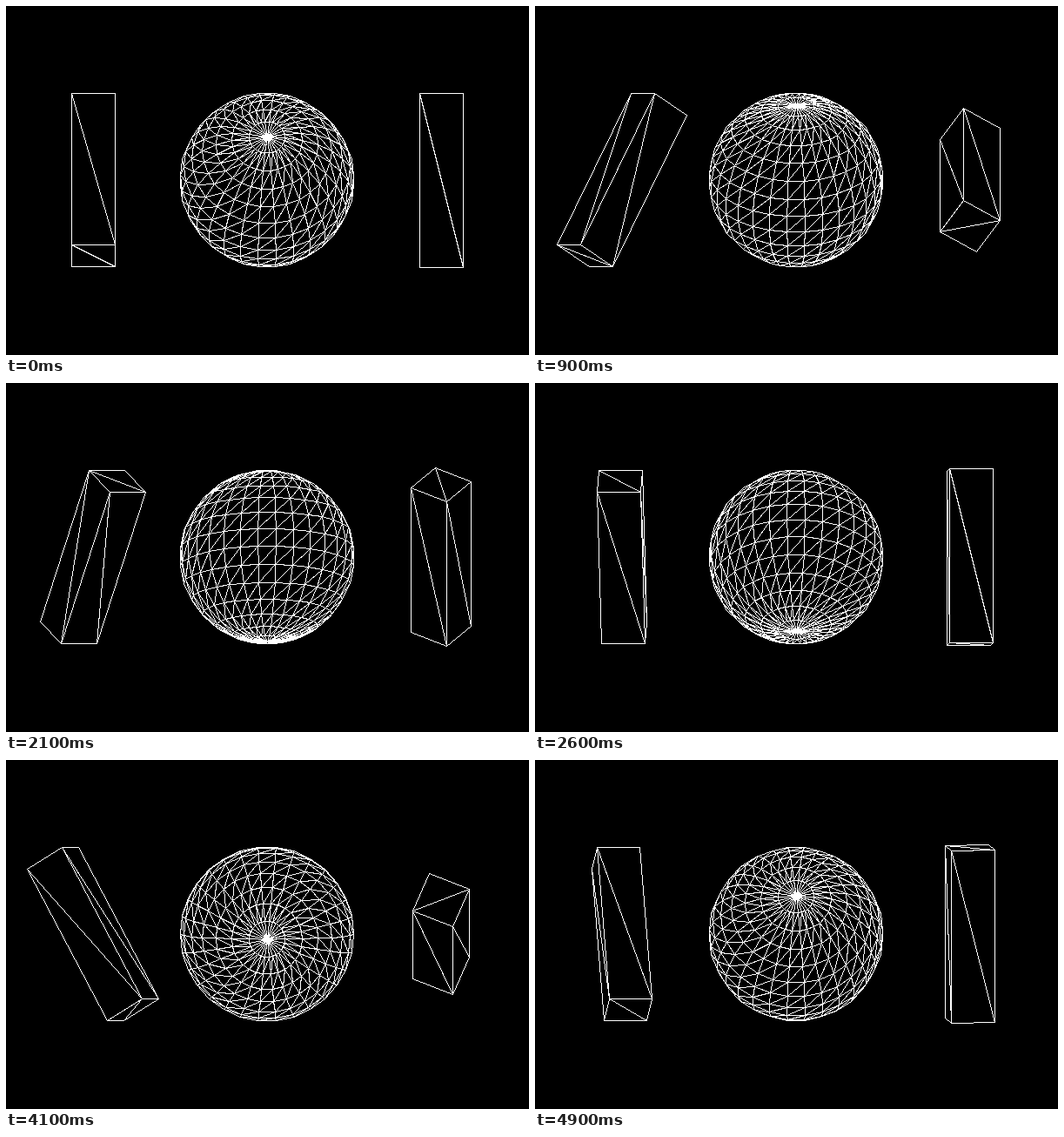
These frames come from a looping animation (601 by 401 pixels, 5000 ms). An HTML page with a canvas:

```html
<!DOCTYPE html>
<html lang="en">
<head>
<meta charset="utf-8">
<title>Wireframe solids</title>
<style>
  html, body { margin: 0; width: 100%; height: 100%; overflow: hidden; background: #000; }
  canvas { display: block; }
</style>
</head>
<body>
<canvas id="stage" width="601" height="401"></canvas>
<script>
const W = 601, H = 401;
const LOOP = 5000, STEP = 100, TURN_STEPS = 49;
const BLACK = 0xff000000, WHITE = 0xffffffff;

const ctx = document.getElementById('stage').getContext('2d');
const image = ctx.createImageData(W, H);
const pixels = new Uint32Array(image.data.buffer);

const rad = deg => deg * Math.PI / 180;

// Axes: x right, y down, z towards the viewer.
function rotX(deg) {
  const c = Math.cos(rad(deg)), s = Math.sin(rad(deg));
  return ([x, y, z]) => [x, y * c - z * s, y * s + z * c];
}

function rotY(deg) {
  const c = Math.cos(rad(deg)), s = Math.sin(rad(deg));
  return ([x, y, z]) => [x * c - z * s, y, x * s + z * c];
}

// Quads run clockwise seen from outside; each is split from corner 0 to corner 2.
const split = quads => quads.flatMap(([a, b, c, d]) => [[a, b, c], [a, c, d]]);

function makeBox(w, h, d) {
  const ring = [[-1, 1], [1, 1], [1, -1], [-1, -1]];
  const corner = ([x, z], y) => [x * w / 2, y * h / 2, z * d / 2];
  const quads = ring.map((a, i) => {
    const b = ring[(i + 1) % 4];
    return [corner(a, -1), corner(b, -1), corner(b, 1), corner(a, 1)];
  });
  quads.push([...ring].reverse().map(p => corner(p, -1)));
  quads.push(ring.map(p => corner(p, 1)));
  return split(quads);
}

function makeSphere(r, rows, cols) {
  const point = (i, j) => {
    const polar = Math.PI * i / rows, lon = 2 * Math.PI * j / cols;
    const s = r * Math.sin(polar);
    return [s * Math.cos(lon), s * Math.sin(lon), r * Math.cos(polar)];
  };
  const quads = [];
  for (let i = 0; i < rows; i++) {
    for (let j = 0; j < cols; j++) {
      quads.push([point(i, j), point(i + 1, j), point(i + 1, j + 1), point(i, j + 1)]);
    }
  }
  return split(quads);
}

// Hard-edged one-pixel line.
function line([x, y], [x1, y1]) {
  const dx = Math.abs(x1 - x), dy = -Math.abs(y1 - y);
  const sx = x < x1 ? 1 : -1, sy = y < y1 ? 1 : -1;
  let err = dx + dy;
  for (;;) {
    pixels[y * W + x] = WHITE;
    if (x === x1 && y === y1) return;
    const e = 2 * err;
    if (e >= dy) { err += dy; x += sx; }
    if (e <= dx) { err += dx; y += sy; }
  }
}

function drawMesh(mesh, cx, cy, ...turns) {
  const place = p => turns.reduce((q, turn) => turn(q), p);
  const snap = ([x, y]) => [Math.floor(cx + x + 1e-6), Math.floor(cy + y + 1e-6)];
  for (const tri of mesh) {
    const [a, b, c] = tri.map(place);
    const facing = (b[0] - a[0]) * (c[1] - a[1]) - (b[1] - a[1]) * (c[0] - a[0]);
    if (facing < 1e-6) continue;
    const [p, q, r] = [a, b, c].map(snap);
    line(p, q);
    line(q, r);
    line(r, p);
  }
}

const box = makeBox(50, 200, 50);
const sphere = makeSphere(100, 15, 30);

function draw(step) {
  const angle = Math.floor(360 * step / TURN_STEPS);
  pixels.fill(BLACK);
  drawMesh(box, 100, 200, rotX(30), rotY(angle));
  drawMesh(sphere, 300, 200, rotX(30 + angle / 2));
  drawMesh(box, 500, 200, rotY(angle), rotX(angle));
  ctx.putImageData(image, 0, 0);
}

const start = performance.now();
let shown = -1;

function tick() {
  const t = (performance.now() - start) % LOOP;
  // The first pose is held for two steps.
  const step = Math.max(0, Math.floor(t / STEP) - 1);
  if (step !== shown) draw(shown = step);
  requestAnimationFrame(tick);
}
tick();
</script>
</body>
</html>
```
